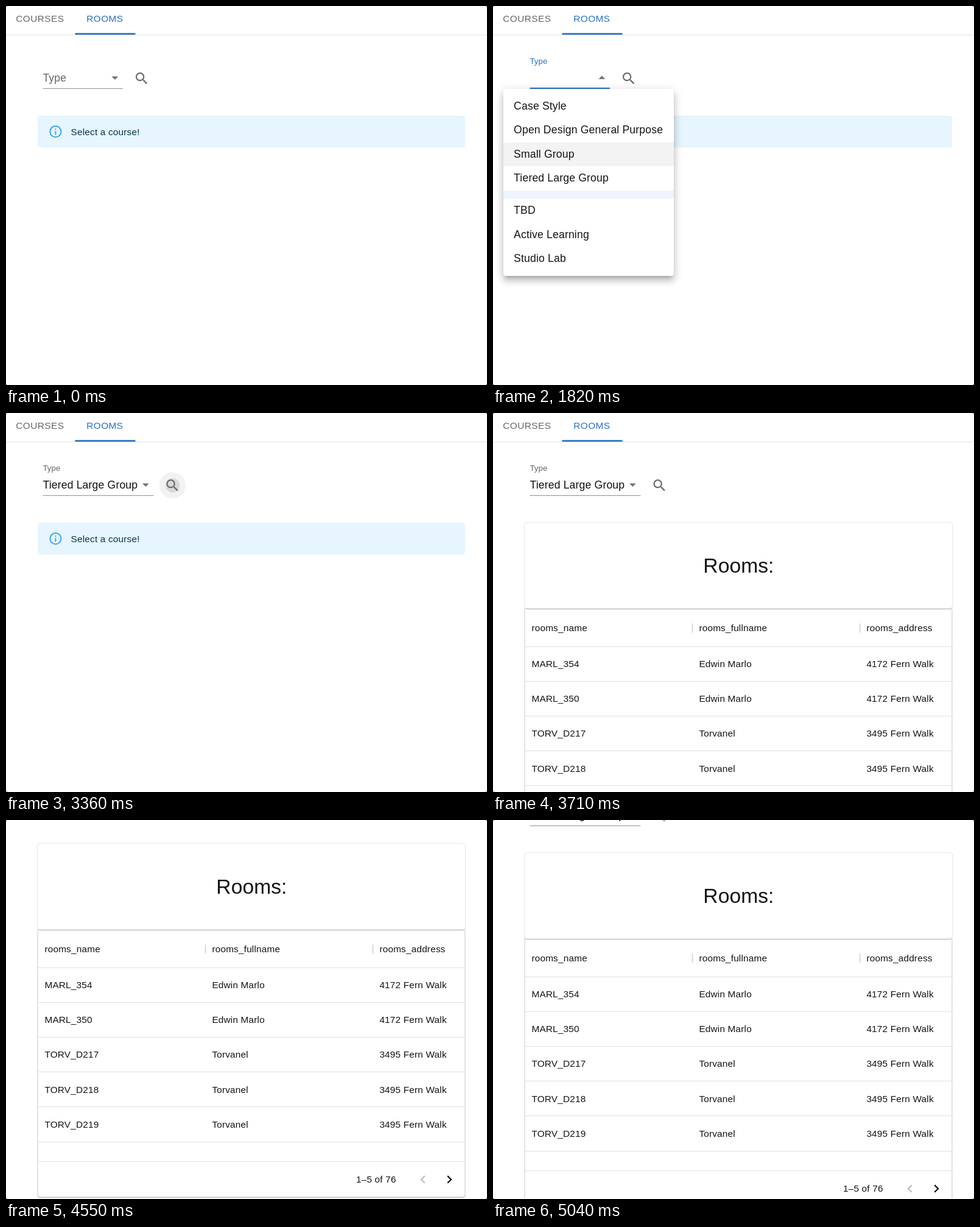
Write an HTML page that moves like this. It is 790x622 px and loops after 5.53 s.

```html
<!DOCTYPE html>
<html lang="en">
<head>
<meta charset="utf-8">
<title>Room search</title>
<style>
  html, body { margin: 0; width: 100%; height: 100%; overflow: hidden; background: #fff; }
  body, text { font: 15.4px "Liberation Sans", Helvetica, Arial, sans-serif; letter-spacing: .165px; }
  body { position: relative; color: #141414; }
  #page, #page svg, .card, #menu, #corners { position: absolute; }
  #page { left: 0; top: 0; }
  #page svg { left: 0; top: 0; overflow: visible; }
  .card {
    left: 52px; width: 702px; box-sizing: border-box; background: #fff;
    box-shadow: 0 1px 1px #00000038, 0 0 2px #00000048;
  }
  #grid { top: 322px; height: 438px; border: 1px solid #e0e0e0; border-top: 0; border-radius: 0 0 4px 4px; }
  #heading { top: 180px; height: 141px; border-radius: 4px; }
  #menu {
    left: 16.5px; top: 135.8px; width: 280.5px; padding: 8.8px 0; border-radius: 4px;
    background: #fff; transform-origin: 110.5px 0; font-size: 17.6px;
    box-shadow: 0 5.5px 5.5px -3.3px #0003, 0 8.8px 11px 1px #00000024, 0 3.3px 15.4px 2px #0000001f;
  }
  .item {
    position: relative; overflow: hidden; height: 39.55px; line-height: 39.55px;
    padding-left: 17.6px; white-space: nowrap;
  }
  .item.blank { height: 13.2px; background: #eef4fc; }
  .item i { position: absolute; border-radius: 50%; background: #000; }
  #corners { inset: 0; border-radius: 3px; box-shadow: 0 0 0 3px #666; }
</style>
</head>
<body>
<div id="page">
  <div id="results">
    <div class="card" id="grid"></div>
    <div class="card" id="heading"></div>
  </div>
  <svg id="art" width="790" height="770"></svg>
</div>
<div id="menu"></div>
<div id="corners"></div>
<script>
const LOOP = 5530, STEP = 70;
const BLUE = [38, 112, 196], GRAY = [102, 102, 102], INK = '#141414';
const HOVER_SELECT = 1190, OPEN = 1320, HOVER_SMALL = 1675, HOVER_TIERED = 1955;
const PRESS_ITEM = 2370, CLOSE = 2493, HOVER_SEARCH = 3100, PRESS_SEARCH = 3160;
const RELEASE_SEARCH = 3270, SHOW_RESULTS = 3430, LEAVE_SEARCH = 3710, SCROLL = 4200;
const GROW = 306;
// Page offset every 70 ms: a flick past the end, then the bounce back.
const SCROLL_PATH = [0, 26, 70, 106, 130, 141, 140, 136, 133, 131, 129, 127, 126];

const $ = id => document.getElementById(id);
const rgb = c => `rgb(${c.map(Math.round)})`;
const mix = (a, b, p) => a + (b - a) * p;
const ramp = (t, start, length) => Math.min(1, Math.max(0, (t - start) / length));

// cubic-bezier(x1, 0, .2, 1)
const bezier = x1 => x => {
  let low = 0, high = 1;
  for (let i = 0; i < 22; i++) {
    const s = (low + high) / 2, r = 1 - s;
    if (3 * x1 * s * r * r + .6 * s * s * r + s * s * s < x) low = s; else high = s;
  }
  return low * low * (3 - 2 * low);
};
const easeInOut = bezier(.4), easeOut = bezier(0);

const text = (x, y, s, attrs = '') => `<text x="${x}" y="${y}" fill="${INK}" ${attrs}>${s}</text>`;
const rect = (x, y, w, h, fill, attrs = '') =>
  `<rect x="${x}" y="${y}" width="${w}" height="${h}" fill="${fill}" ${attrs}/>`;
const icon = (x, y, d, fill) =>
  `<path transform="translate(${x} ${y}) scale(1.1)" d="${d}" fill="${fill}"/>`;

const SEARCH = 'M15.5 14h-.79l-.28-.27C15.41 12.59 16 11.11 16 9.5 16 5.91 13.09 3 9.5 3S3 5.91 3 9.5 5.91 16 9.5 16c1.61 0 3.09-.59 4.23-1.57l.27.28v.79l5 4.99L20.49 19l-4.99-5zm-6 0C7.01 14 5 11.99 5 9.5S7.01 5 9.5 5 14 7.01 14 9.5 11.99 14 9.5 14z';
const CHEVRON_RIGHT = 'M8.59 16.34l4.58-4.59-4.58-4.59L10 5.75l6 6-6 6z';
const CHEVRON_LEFT = 'M15.41 16.09l-4.58-4.59 4.58-4.59L14 5.5l-6 6 6 6z';

const tabs =
  text(16.2, 26, 'COURSES', 'style="letter-spacing:.44px;fill:#666"') +
  text(132.2, 26, 'ROOMS', `style="letter-spacing:.44px;fill:${rgb(BLUE)}"`) +
  rect(0, 47, 790, 1, '#e2e2e2') + rect(113.5, 44.4, 99, 2.6, rgb(BLUE));

const field =
  rect(60.5, 101, 182, 34, '#f2f2f2', 'id="focus"') +
  '<text id="label" x="0" y="0" style="font-size:17.6px">Type</text>' +
  text(60.4, 123.7, 'Tiered Large Group', 'id="value" style="font-size:17.6px;fill:#111"') +
  '<path id="arrow" d="M-5.5 -2.2h11l-5.5 5.5z" fill="#757575"/>' +
  rect(60.5, 135, 0, 1, '#909090', 'id="line"') + rect(0, 134, 0, 2, rgb(BLUE), 'id="active"') +
  `<g id="search"><circle id="halo" cx="223" cy="118.8" r="21.6"/>
   <circle id="ripple" cx="223" cy="118.8"/>${icon(209.7, 105.7, SEARCH, '#6c6c6c')}</g>`;

const alertBox = `<g id="alert">${rect(52, 180, 702, 52.4, '#e6f5fe', 'rx="4.4"')}
  <circle cx="81.4" cy="206.2" r="9.1" fill="none" stroke="#36a9e8" stroke-width="2"/>
  ${rect(80.4, 201.2, 2, 2, '#36a9e8')}${rect(80.4, 205.2, 2, 6, '#36a9e8')}
  ${text(106.6, 212, 'Select a course!', 'style="fill:#06344d"')}</g>`;

const rows = [
  ['MARL_354', 'Edwin Marlo', '4172 Fern Walk'],
  ['MARL_350', 'Edwin Marlo', '4172 Fern Walk'],
  ['TORV_D217', 'Torvanel', '3495 Fern Walk'],
  ['TORV_D218', 'Torvanel', '3495 Fern Walk'],
  ['TORV_D219', 'Torvanel', '3495 Fern Walk'],
];
const cells = (names, y) => names.map((name, i) => text(63.4 + 275 * i, y, name)).join('');
const rule = y => rect(53, Math.round(y), 700, 1, '#e0e0e0');
const table = '<g id="table">' +
  text(403.4, 262, 'Rooms:', 'text-anchor="middle" style="font-size:33.7px;letter-spacing:0"') +
  cells(['rooms_name', 'rooms_fullname', 'rooms_address'], 358.2) +
  [326.5, 601.5].map(x => rect(x, 345.5, 2, 15, '#dadada')).join('') + rule(382.6) +
  rows.map((row, i) => cells(row, 417 + 57.2 * i) + rule(439.8 + 57.2 * i)).join('') +
  rule(701) + text(575, 736.3, '1–5 of 76') +
  icon(671.6, 718.3, CHEVRON_LEFT, '#bdbdbd') + icon(715, 718, CHEVRON_RIGHT, '#111') + '</g>';

$('art').innerHTML = tabs + field + alertBox + table;

$('menu').innerHTML = ['Case Style', 'Open Design General Purpose', 'Small Group', 'Tiered Large Group',
  '', 'TBD', 'Active Learning', 'Studio Lab']
  .map(name => `<div class="item ${name ? '' : 'blank'}">${name}</div>`).join('');
const [, , smallItem, tieredItem] = $('menu').children;
const itemRipple = tieredItem.appendChild(document.createElement('i'));

const set = (id, attrs) => {
  for (const name in attrs) $(id).setAttribute(name, attrs[name]);
};
const show = (id, visible) => { $(id).style.display = visible ? '' : 'none'; };

function rippleAt(t, press, release, radius) {
  const p = easeInOut(ramp(t, press, 550));
  const fade = 1 - easeInOut(ramp(t, release, 550));
  return { r: radius * p, alpha: t < press ? 0 : mix(.1, .3, p) * fade };
}

function drawField(t) {
  const chosen = t >= CLOSE, width = chosen ? 182 : 131.5;
  const shrink = easeOut(ramp(t, OPEN, 200));
  const active = shrink - easeOut(ramp(t, PRESS_SEARCH, 200));
  const hovered = t >= HOVER_SELECT && t < OPEN;

  set('label', {
    transform: `translate(60.4 ${mix(123.7, 95.3, shrink)}) scale(${mix(1, .75, shrink)})`,
    fill: rgb(GRAY.map((c, i) => mix(c, BLUE[i], active))),
  });
  set('arrow', {
    transform: `translate(${60.5 + width - 13.1} 117.7) rotate(${t >= OPEN && !chosen ? 180 : 0})`,
  });
  set('line', { width, y: hovered ? 134 : 135, height: hovered ? 2 : 1, fill: hovered ? '#333' : '#909090' });
  set('active', { x: 60.5 + width / 2 * (1 - active), width: width * active });
  show('value', chosen);
  show('focus', chosen && t < PRESS_SEARCH);

  const ripple = rippleAt(t, PRESS_SEARCH, RELEASE_SEARCH, 22);
  const over = t < LEAVE_SEARCH;
  set('search', { transform: `translate(${chosen ? 50.5 : 0} 0)` });
  set('halo', { 'fill-opacity': over ? .05 * ramp(t, HOVER_SEARCH, 150) : 0 });
  set('ripple', { r: ripple.r, 'fill-opacity': over ? .54 * ripple.alpha : 0 });
}

function drawMenu(t) {
  const visible = t >= OPEN && t < CLOSE + GROW;
  show('menu', visible);
  if (!visible) return;
  const opacity = easeInOut(ramp(t, OPEN, GROW)) - easeInOut(ramp(t, CLOSE, GROW));
  const size = easeInOut(ramp(t, OPEN, GROW * .666)) -
    easeInOut(ramp(t, CLOSE + GROW * .333, GROW * .666));
  $('menu').style.opacity = opacity;
  $('menu').style.transform = `scale(${mix(.75, 1, size)}, ${mix(.5625, 1, size)})`;

  const toTiered = ramp(t, HOVER_TIERED, 150);
  const tint = alpha => `rgba(0,0,0,${.05 * alpha})`;
  smallItem.style.background = tint(ramp(t, HOVER_SMALL, 150) - toTiered);
  tieredItem.style.background = tint(toTiered);

  const { r, alpha } = rippleAt(t, PRESS_ITEM, CLOSE, 190);
  itemRipple.style.cssText =
    `left:${180 - r}px;top:${20 - r}px;width:${2 * r}px;height:${2 * r}px;opacity:${alpha * .87}`;
}

function drawPage(t) {
  const found = t >= SHOW_RESULTS;
  show('alert', !found);
  show('results', found);
  show('table', found);
  const step = Math.min(SCROLL_PATH.length - 1, Math.max(0, Math.floor((t - SCROLL) / STEP)));
  $('page').style.top = -SCROLL_PATH[step] + 'px';
}

const start = performance.now();
function frame() {
  const elapsed = (performance.now() - start) % LOOP;
  const t = Math.floor(elapsed / STEP) * STEP;
  drawField(t);
  drawMenu(t);
  drawPage(t);
  requestAnimationFrame(frame);
}
frame();
</script>
</body>
</html>
```
